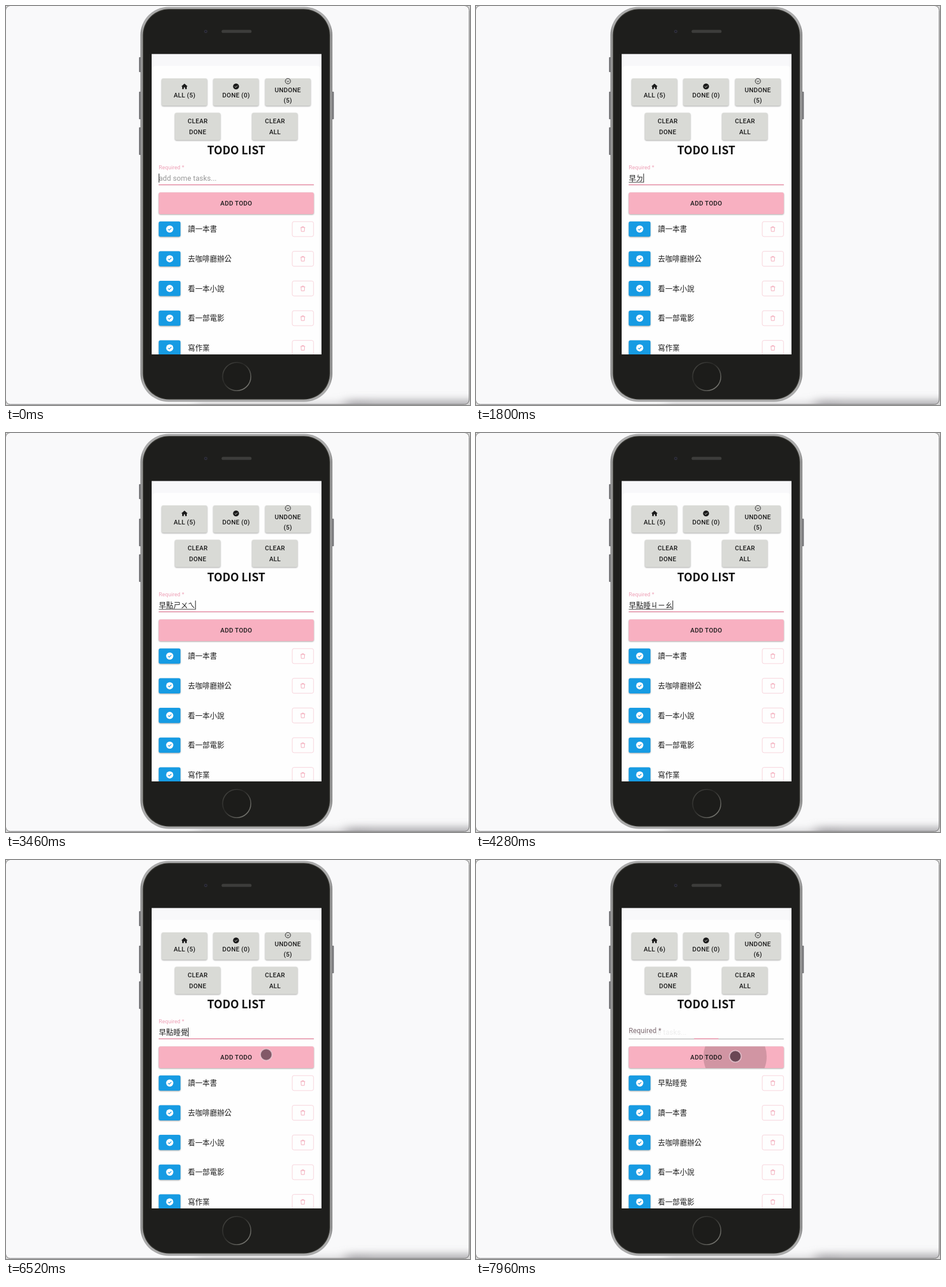
Recreate the animation shown at these times as an HTML page. Size 806 by 694 pixels, loop 8 s.

```html
<!DOCTYPE html>
<html lang="zh-Hant">
<head>
<meta charset="utf-8">
<title>Todo list</title>
<style>
html, body { margin: 0; width: 100%; height: 100%; overflow: hidden; background: #f9f9fa; }
svg { display: block; width: 806px; height: 694px; }
text { font-family: Roboto, "Noto Sans CJK TC", "Noto Sans CJK", sans-serif; fill: #1b1b1b; }
.btn { font-size: 10.98px; font-weight: 500; letter-spacing: .0286em; text-anchor: middle; }
.body { font-size: 12.55px; letter-spacing: .0094em; }
.title { font: 700 19.4px "Noto Sans CJK TC", "Noto Sans CJK", Inter, sans-serif; text-anchor: middle; fill: #111; }
.raised { filter: drop-shadow(0 1.4px 1px rgba(0,0,0,.34)); }
</style>
</head>
<body>
<svg id="stage" viewBox="0 0 806 694" xmlns="http://www.w3.org/2000/svg"></svg>
<script>
const LOOP = 8000;
const ROWS = [388, 439.7, 491.3, 543, 594.7];
const TASKS = ['讀一本書', '去咖啡廳辦公', '看一本小說', '看一部電影', '寫作業'];
const NEW_TASK = '早點睡覺';
const PRESS = 7811, ADDED = 7860, COMMIT = 5030;

// [time, text in the field]
const KEYS = [
  [-250, ''], [1150, 'ㄗ'], [1330, 'ㄗㄠ'], [1540, '早'],
  [1800, '早ㄉ'], [1980, '早ㄉㄧ'], [2180, '早ㄉㄧㄢ'], [2420, '早點'],
  [2900, '早點ㄕ'], [3100, '早點ㄕㄨ'], [3300, '早點ㄕㄨㄟ'], [3520, '早點睡'],
  [3820, '早點睡ㄐ'], [4020, '早點睡ㄐㄧ'], [4200, '早點睡ㄐㄧㄠ'], [4440, NEW_TASK],
  [COMMIT, NEW_TASK]
];

// [time, x, y] of the pointer
const PATH = [[5460, 810, 612], [5540, 799.5, 598], [5940, 655, 500], [6180, 520, 392],
  [6460, 452, 338.5], [7300, 452, 338.5], [7700, 450.5, 341.5]];

const rect = (x, y, w, h, r, fill, extra = '') =>
  `<rect x="${x}" y="${y}" width="${w}" height="${h}" rx="${r}" fill="${fill}" ${extra}/>`;
const text = (x, y, cls, str, extra = '') =>
  `<text x="${x}" y="${y}" class="${cls}" ${extra}>${str}</text>`;
const greyButton = (x, y) => rect(x, y, 79, 47.4, 3, '#d9dad6', 'class="raised"');

function row(y, i) {
  return rect(265.3, y - 13.3, 37.8, 26.6, 3, '#169be3', 'class="raised"') +
    `<circle cx="284.4" cy="${y}" r="6.2" fill="#fff"/>
    <path d="M281.7 ${y + .1}l1.9 1.9 3.7-3.7" fill="none" stroke="#169be3" stroke-width="1.2"/>` +
    text(316, y + 4.4, 'body', '', `id="task${i}"`) +
    rect(497.2, y - 13, 37, 26, 3, 'none', 'stroke="#f6cdd6" stroke-width=".9"') +
    `<path d="M511.6 ${y - 2.7}h8M514 ${y - 2.7}v-1.5h3.2v1.5M512.5 ${y - 2.7}l.5 6.8h5.2l.5-6.8"
      fill="none" stroke="#f2a4b5" stroke-width=".9"/>`;
}

const stage = document.getElementById('stage');
stage.innerHTML = `
<defs>
  <linearGradient id="ring" x1="0" y1="0" x2="1" y2="1">
    <stop offset="0" stop-color="#4a4a46"/><stop offset=".4" stop-color="#292927"/>
    <stop offset=".65" stop-color="#4c4c48"/><stop offset="1" stop-color="#8c8c86"/>
  </linearGradient>
  <linearGradient id="rim" x1="0" x2="1">
    <stop offset="0" stop-color="#858585"/><stop offset=".015" stop-color="#aaa"/>
    <stop offset=".985" stop-color="#aaa"/><stop offset="1" stop-color="#858585"/>
  </linearGradient>
  <filter id="soft" x="-20%" y="-200%" width="140%" height="500%"><feGaussianBlur stdDeviation="10 7"/></filter>
  <clipPath id="screen"><rect x="253" y="83.5" width="295" height="522.5"/></clipPath>
  <clipPath id="addClip"><rect x="265.3" y="324.3" width="269.4" height="37.6" rx="3"/></clipPath>
  <clipPath id="window"><rect x="-1" y="-1" width="805.5" height="694" rx="8"/></clipPath>
</defs>
${rect(0, 0, 806, 694, 0, '#d5d5d5')}
<g clip-path="url(#window)">
  ${rect(0, 0, 806, 694, 0, '#f9f9fa')}
  <g filter="url(#soft)">${rect(590, 685, 260, 30, 0, '#8d8a90', 'opacity=".65"')}${rect(330, 690, 300, 20, 0, '#99969c', 'opacity=".4"')}</g>
</g>
<rect x="-.5" y="-.5" width="805" height="693.5" rx="8" fill="none" stroke="#6d6d6d"/>
${[[231, 89, 26], [231, 149, 48], [231, 211, 48], [565.5, 149, 48]]
  .map(([x, y, h]) => rect(x, y, 4, h, 1, '#77777a')).join('')}
${rect(233.5, 1.5, 333.5, 687, 49, 'url(#rim)')}
${rect(237.6, 5.3, 325.2, 679.2, 45.5, '#34342f')}
${rect(239, 6.5, 322.5, 676.8, 44.5, '#1e1e1c')}
<circle cx="347" cy="44.2" r="2.8" fill="#30303a"/><circle cx="347" cy="44.2" r="1.2" fill="#181824"/>
${rect(374.5, 41.6, 52, 5.2, 2.6, '#3d3d3b')}
<circle cx="400.8" cy="644.5" r="24.5" fill="#1c1c1a" stroke="url(#ring)" stroke-width="1.7"/>
<g clip-path="url(#screen)">
  ${rect(253, 83, 295, 524, 0, '#f8f8fa')}
  ${rect(253, 104, 295, 560, 8, '#fefefe')}
  ${[270.4, 360, 450.2].map(x => greyButton(x, 126)).join('')}
  ${[293.4, 427.4].map(x => greyButton(x, 185.8)).join('')}
  <path d="M310 135l-5.6 5h1.6v4.6h2.9v-3.2h2.2v3.2h2.9V140h1.6z" fill="#1b1b1b"/>
  <circle cx="399.6" cy="139.9" r="5.2" fill="#1b1b1b"/>
  <path d="M397.3 140l1.7 1.7 3.1-3.1" fill="none" stroke="#d9dad6" stroke-width="1"/>
  <circle cx="489.7" cy="130.7" r="4.6" fill="none" stroke="#1b1b1b"/>
  <path d="M487.6 130l2.1 2 2.1-2" fill="none" stroke="#1b1b1b"/>
  ${text(310.2, 159, 'btn', '', 'id="all"')}
  ${text(399.8, 159, 'btn', 'DONE (0)')}
  ${text(489.6, 149.6, 'btn', 'UNDONE')}
  ${text(489.6, 168.3, 'btn', '', 'id="undone"')}
  ${text(333, 204, 'btn', 'CLEAR')}${text(333, 222.8, 'btn', 'DONE')}
  ${text(467.2, 204, 'btn', 'CLEAR')}${text(467.2, 222.8, 'btn', 'ALL')}
  ${text(400, 258, 'title', 'TODO LIST')}
  ${text(0, 0, 'body', 'Required *', 'id="label"')}
  ${text(265.4, 304.2, 'body', 'add some tasks...', 'id="hint"')}
  ${text(265.4, 304.2, 'body', '', 'id="value"')}
  ${rect(265.4, 306, 0, .9, 0, '#333', 'id="compose"')}
  ${rect(265.4, 291.5, 1, 15.6, 0, '#111', 'id="caret"')}
  ${rect(265.3, 310.8, 269.4, .8, 0, '#8a8a8a')}
  ${rect(265.3, 310.1, 269.4, 1.6, 0, '#f29fb5', 'id="focus"')}
  ${rect(265.3, 324.3, 269.4, 37.6, 3, '#f8b0c1', 'class="raised"')}
  ${text(400, 347, 'btn', 'ADD TODO')}
  <g clip-path="url(#addClip)"><circle id="ripple" cx="450" cy="342" r="0"/></g>
  ${ROWS.map(row).join('')}
  <circle id="touch" r="10.2" stroke="#e9cbd4" stroke-opacity=".8" stroke-width="1.8"/>
</g>
<path id="arrow" d="M0 0v13.6l3.1-2.9 2.2 5 2.5-1.1-2.2-4.8h4.3z" fill="#000" stroke="#fff" stroke-width=".9"/>`;

const ui = {};
stage.querySelectorAll('[id]').forEach(el => ui[el.id] = el);
const set = (el, attrs) => { for (const k in attrs) el.setAttribute(k, attrs[k]); };
const show = (el, on) => set(el, { visibility: on ? 'visible' : 'hidden' });
const write = (el, str) => { if (el.textContent !== str) el.textContent = str; };
const clamp = v => Math.min(1, Math.max(0, v));
const mix = (a, b, p) => a + (b - a) * p;

// cubic-bezier(x1, 0, .2, 1)
function ease(x1, x) {
  let lo = 0, hi = 1, s = .5;
  for (let i = 0; i < 20; i++) {
    s = (lo + hi) / 2;
    const q = 1 - s;
    if (3 * q * q * s * x1 + 3 * q * s * s * .2 + s ** 3 < x) lo = s; else hi = s;
  }
  return x <= 0 ? 0 : x >= 1 ? 1 : 3 * (1 - s) * s * s + s ** 3;
}

function pointerAt(t) {
  const i = PATH.findIndex(p => p[0] > t);
  if (i === 0) return PATH[0].slice(1);
  if (i < 0) return PATH[PATH.length - 1].slice(1);
  const [a, b] = [PATH[i - 1], PATH[i]];
  const p = (t - a[0]) / (b[0] - a[0]);
  return [mix(a[1], b[1], p), mix(a[2], b[2], p)];
}

function draw(t) {
  const added = t >= ADDED;
  const count = added ? 6 : 5;
  write(ui.all, `ALL (${count})`);
  write(ui.undone, `(${count})`);
  const list = added ? [NEW_TASK, ...TASKS] : TASKS;
  ROWS.forEach((_, i) => write(ui['task' + i], list[i]));

  const [keyTime, typed] = KEYS.filter(k => k[0] <= t).pop();
  const value = added ? '' : typed;
  const width = value.length * 12.67;
  write(ui.value, value);
  set(ui.compose, { width: t < COMMIT ? width : 0 });
  set(ui.caret, { x: 265.3 + width });
  show(ui.caret, !added && (t - keyTime) % 1000 < 500);

  // the field loses focus
  const blur = ease(0, clamp((t - ADDED) / 200));
  const scale = mix(.75, 1, blur);
  const tint = [[238, 110], [160, 102], [182, 106]].map(([a, b]) => Math.round(mix(a, b, blur)));
  set(ui.label, { transform: `translate(265.3 ${mix(283.7, 304, blur)}) scale(${scale})`, style: `fill:rgb(${tint})` });
  set(ui.hint, { opacity: value ? 0 : .45 * (1 - blur) });
  set(ui.focus, { transform: `translate(400 0) scale(${1 - blur} 1) translate(-400 0)` });

  const spread = ease(.4, clamp((t - PRESS) / 550));
  set(ui.ripple, { r: 187 * spread, opacity: t < PRESS ? 0 : .1 + .2 * spread });

  // arrow outside the screen, touch dot inside it
  const [x, y] = pointerAt(t);
  const inside = x > 253 && x < 548 && y > 84 && y < 606;
  const move = `translate(${x} ${y})`;
  set(ui.arrow, { transform: move });
  set(ui.touch, { transform: move, fill: t < PRESS ? 'rgba(70,45,58,.66)' : 'rgba(70,45,58,.74)' });
  show(ui.arrow, !inside);
  show(ui.touch, inside);
}

const start = performance.now();
function tick() {
  draw((performance.now() - start) % LOOP);
  requestAnimationFrame(tick);
}
draw(0);
requestAnimationFrame(tick);
</script>
</body>
</html>
```
